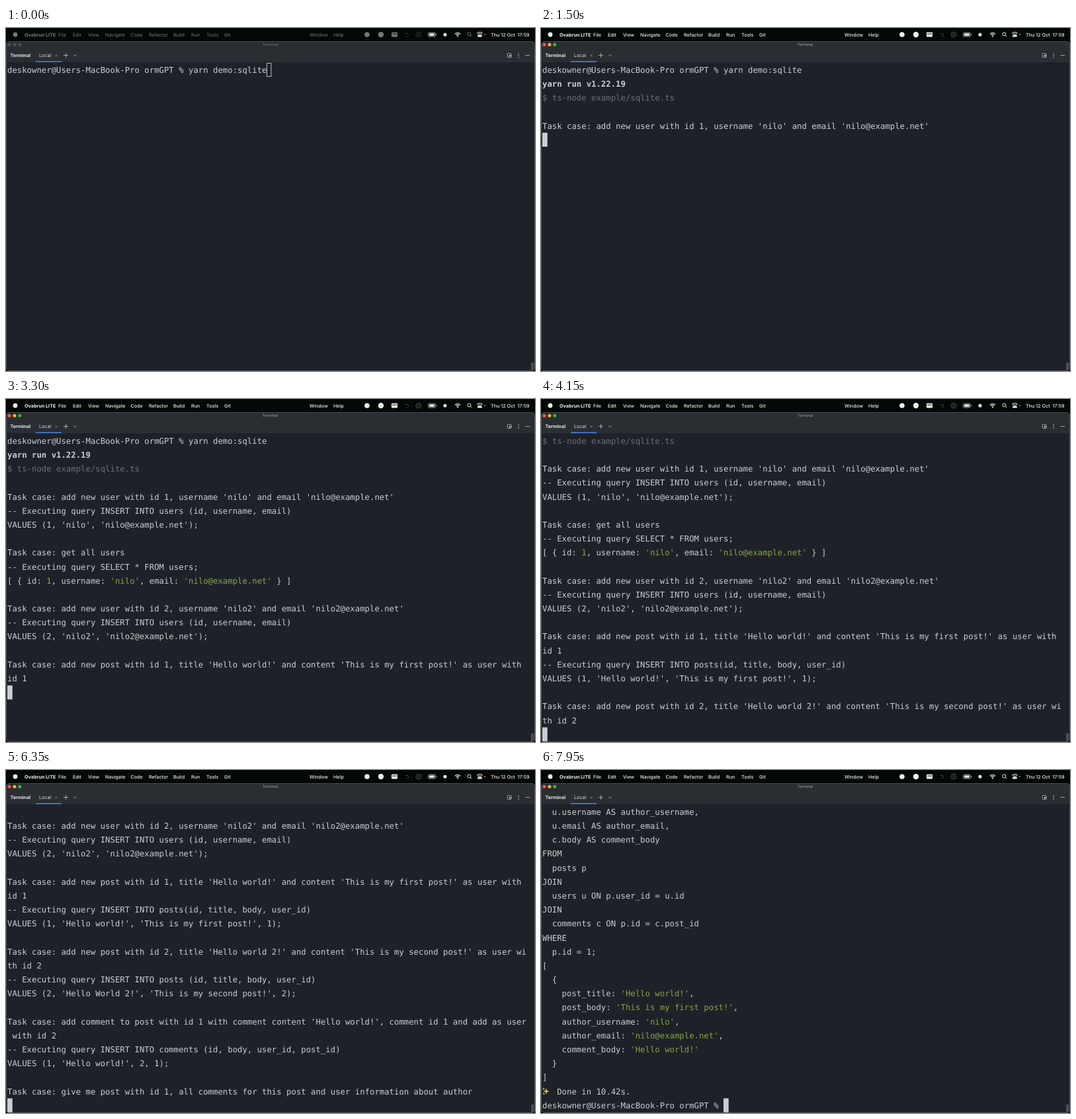
Write an HTML page with a canvas that moves like this. It is 800x520 px and loops after 8 s.

```html
<!DOCTYPE html>
<html lang="en">
<head>
<meta charset="utf-8">
<title>Terminal demo</title>
<style>
html, body { margin: 0; width: 100%; height: 100%; overflow: hidden; background: #040807; }
canvas { display: block; width: 800px; height: 520px; }
</style>
</head>
<body>
<canvas id="stage" width="800" height="520"></canvas>
<script>
const ctx = document.getElementById('stage').getContext('2d');
const LOOP = 8000, FOCUS = 250;
const COL = 7.405, ROW = 21.19, LEFT = 2, BASE = 67.8, ROWS = 22;
const MONO = '12.3px "DejaVu Sans Mono", monospace';
const UI = 'Inter, sans-serif';
const FG = '#cbcdd0', GRAY = '#6c6f72', GREEN = '#85a545';

const prompt = 'deskowner@Users-MacBook-Pro ormGPT % ';
const name1 = 'nilo', name2 = 'nilo2';
const mail1 = name1 + '@example.net', mail2 = name2 + '@example.net';

// Output by time. Line prefix * is bold, % is gray; ~ toggles green.
const output = [
  [0, prompt + 'yarn demo:sqlite'],
  [400, '\n'],
  [750, '*yarn run v1.22.19\n'],
  [900, '%$ ts-node example/sqlite.ts\n'],
  [1200, `
Task case: add new user with id 1, username '${name1}' and email '${mail1}'
`],
  [1800, `-- Executing query INSERT INTO users (id, username, email)
VALUES (1, '${name1}', '${mail1}');

Task case: get all users
`],
  [2400, `-- Executing query SELECT * FROM users;
[ { id: ~1~, username: ~'${name1}'~, email: ~'${mail1}'~ } ]

Task case: add new user with id 2, username '${name2}' and email '${mail2}'
`],
  [3050, `-- Executing query INSERT INTO users (id, username, email)
VALUES (2, '${name2}', '${mail2}');

Task case: add new post with id 1, title 'Hello world!' and content 'This is my first post!' as user with
id 1
`],
  [3900, `-- Executing query INSERT INTO posts(id, title, body, user_id)
VALUES (1, 'Hello world!', 'This is my first post!', 1);

Task case: add new post with id 2, title 'Hello world 2!' and content 'This is my second post!' as user wi
th id 2
`],
  [5600, `-- Executing query INSERT INTO posts (id, title, body, user_id)
VALUES (2, 'Hello World 2!', 'This is my second post!', 2);

Task case: add comment to post with id 1 with comment content 'Hello world!', comment id 1 and add as user
 with id 2
`],
  [6150, `-- Executing query INSERT INTO comments (id, body, user_id, post_id)
VALUES (1, 'Hello world!', 2, 1);

Task case: give me post with id 1, all comments for this post and user information about author
`],
  [7450, `-- Executing query SELECT
  p.title AS post_title,
  p.body AS post_body,
  u.username AS author_username,
  u.email AS author_email,
  c.body AS comment_body
FROM
  posts p
JOIN
  users u ON p.user_id = u.id
JOIN
  comments c ON p.id = c.post_id
WHERE
  p.id = 1;
[
  {
    post_title: ~'Hello world!'~,
    post_body: ~'This is my first post!'~,
    author_username: ~'${name1}'~,
    author_email: ~'${mail1}'~,
    comment_body: ~'Hello world!'~
  }
]
`],
  [7600, '✨ Done in 10.42s.\n' + prompt]
];

function rect(x, y, w, h, color) {
  ctx.fillStyle = color;
  ctx.fillRect(x, y, w, h);
}
function disc(x, y, r, color) {
  ctx.fillStyle = color;
  ctx.beginPath();
  ctx.arc(x, y, r, 0, Math.PI * 2);
  ctx.fill();
}
function ring(x, y, r, color, from = 0, to = Math.PI * 2) {
  ctx.strokeStyle = color;
  ctx.beginPath();
  ctx.arc(x, y, r, from, to);
  ctx.stroke();
}
function line(color, ...pts) {
  ctx.strokeStyle = color;
  ctx.beginPath();
  for (let i = 0; i < pts.length; i += 2) ctx.lineTo(pts[i], pts[i + 1]);
  ctx.stroke();
}
function box(x, y, w, h, r, color, fill) {
  ctx.fillStyle = ctx.strokeStyle = color;
  ctx.beginPath();
  ctx.roundRect(x, y, w, h, r);
  fill ? ctx.fill() : ctx.stroke();
}
function label(text, x, y, size, color, weight = 400, align = 'left') {
  ctx.font = `${weight} ${size}px ${UI}`;
  ctx.textAlign = align;
  ctx.fillStyle = color;
  ctx.fillText(text, x, y);
}
function star(x, y, r) {
  ctx.fillStyle = '#e2c765';
  ctx.beginPath();
  for (let i = 0; i < 8; i++) {
    const a = i * Math.PI / 4, d = i % 2 ? r * .32 : r;
    ctx.lineTo(x + d * Math.sin(a), y - d * Math.cos(a));
  }
  ctx.fill();
}

function drawMenu(on) {
  const fg = on ? '#eef1f0' : '#747876';
  const dim = on ? '#454a48' : '#303533';
  const bright = '#eef1f0';
  disc(14, 10, 3.4, fg);
  label('Ovabrun LITE', 28, 12.5, 7.2, fg, 700);
  const items = { File: 79, Edit: 101, View: 124, Navigate: 150, Code: 188.5, Refactor: 216,
    Build: 253, Run: 280, Tools: 303, Git: 330, Window: 459, Help: 495 };
  for (const key in items) label(key, items[key], 12.5, 7.2, fg, on ? 500 : 400);

  ctx.lineWidth = 1;
  disc(546, 10, 3.8, fg);
  disc(567, 10, 4.2, fg);
  box(583, 6.5, 9, 7, 1, fg, true);
  line('#0a0e0c', 584, 9, 591, 9);
  ring(606.5, 10.5, 2.2, dim, -2, 2);
  line(dim, 604, 8.5, 606, 8.5);
  ring(624, 10, 4, dim);
  ring(624, 10, 1.8, dim);

  box(638.5, 7, 11, 6, 1.7, '#a9adab', false);
  box(640, 8.3, 8, 3.4, .7, bright, true);
  rect(650.5, 9, 1, 2, '#a9adab');
  disc(664, 10, 2.6, bright);
  ctx.lineWidth = 1.3;
  for (const r of [3.2, 5.7]) ring(683, 13, r, bright, -2.35, -.79);
  disc(683, 12.5, 1.1, bright);
  ctx.lineWidth = 1;
  ring(700.5, 9.3, 2.5, fg);
  line(fg, 702.4, 11.2, 704.5, 13.3);
  box(713, 6.5, 7, 2.6, 1.3, bright, false);
  box(713, 10.5, 7, 3, 1.5, bright, true);
  disc(724, 10, 1, '#d28b3c');
  label('Thu 12 Oct  17:59', 791.5, 12.5, 7.2, bright, 500, 'right');
}

function drawWindow(on) {
  ctx.save();
  ctx.beginPath();
  ctx.roundRect(0, 20, 800, 500, 5);
  ctx.clip();
  rect(0, 20, 800, 500, '#1e2228');
  rect(0, 20, 800, 32, '#2a2d32');
  ctx.restore();
  ctx.lineWidth = 1;
  box(.5, 20.5, 799, 499, 5, '#484c4e', false);

  const lights = on ? ['#f4574f', '#f2b632', '#2bbd43'] : ['#4b4f52', '#4b4f52', '#4b4f52'];
  lights.forEach((c, i) => disc(5 + i * 7.9, 25.2, 2.5, c));
  label('Terminal', 399.5, 27.3, 5.8, on ? '#a4a7aa' : '#74787b', 400, 'center');

  label('Terminal', 6.5, 44.2, 7.2, '#e4e6e8', 700);
  label('Local', 50, 44.2, 7.2, '#dddfe2');
  rect(45, 50, 39, 2, '#4470bd');
  ctx.lineWidth = .8;
  line('#85898d', 74.5, 40.2, 77.7, 43.4);
  line('#85898d', 77.7, 40.2, 74.5, 43.4);
  const icon = '#c3c6ca';
  line(icon, 87, 41.5, 94, 41.5);
  line(icon, 90.5, 38, 90.5, 45);
  line(icon, 102.2, 40.5, 104.4, 42.7, 106.6, 40.5);
  box(758.3, 38.7, 5.8, 5.8, 1, icon, false);
  rect(761, 41, 2.4, 2.2, icon);
  for (const y of [38.8, 41.5, 44.2]) disc(775.2, y, .75, icon);
  line(icon, 785.5, 41.5, 792, 41.5);
  box(794, 507, 4.5, 12, 1, '#4a4e53', true);
}

function drawLine(text, y) {
  let color = FG, weight = '', col = 0;
  if (text[0] === '*') weight = 'bold ';
  if (text[0] === '%') color = GRAY;
  if (weight || color === GRAY) text = text.slice(1);
  if (text[0] === '✨') {
    star(8, y - 4.5, 4.8);
    star(4, y - 8.3, 2.2);
    star(4.4, y - .8, 2.2);
    text = text.slice(1);
    col = 2;
  }
  ctx.font = weight + MONO;
  ctx.textAlign = 'left';
  ctx.fillStyle = color;
  for (const ch of text) {
    if (ch === '~') {
      color = color === FG ? GREEN : FG;
      ctx.fillStyle = color;
    } else {
      ctx.fillText(ch, LEFT + col++ * COL, y);
    }
  }
}

function drawTerminal(t, on) {
  const shown = output.filter(([at]) => at <= t);
  const lines = shown.map(part => part[1]).join('').split('\n');
  const top = Math.max(0, lines.length - ROWS);
  lines.slice(top).forEach((text, i) => drawLine(text, BASE + i * ROW));

  const last = lines.length - 1;
  const x = LEFT + lines[last].length * COL;
  const y = BASE + (last - top) * ROW - 15;
  const since = t - shown[shown.length - 1][0];
  if (!on) {
    ctx.lineWidth = 1;
    ctx.strokeStyle = '#b9bcbf';
    ctx.strokeRect(Math.round(x) + .5, Math.round(y) + .5, 6.5, 20);
  } else if (since % 1000 < 500) {
    rect(x, y, COL + .3, ROW, FG);
  }
}

function draw(now) {
  const t = now % LOOP, on = t >= FOCUS;
  ctx.textRendering = 'geometricPrecision';
  rect(0, 0, 800, 520, '#040807');
  drawMenu(on);
  drawWindow(on);
  drawTerminal(t, on);
}

const start = performance.now();
function tick() {
  draw(performance.now() - start);
  requestAnimationFrame(tick);
}
tick();
</script>
</body>
</html>
```
